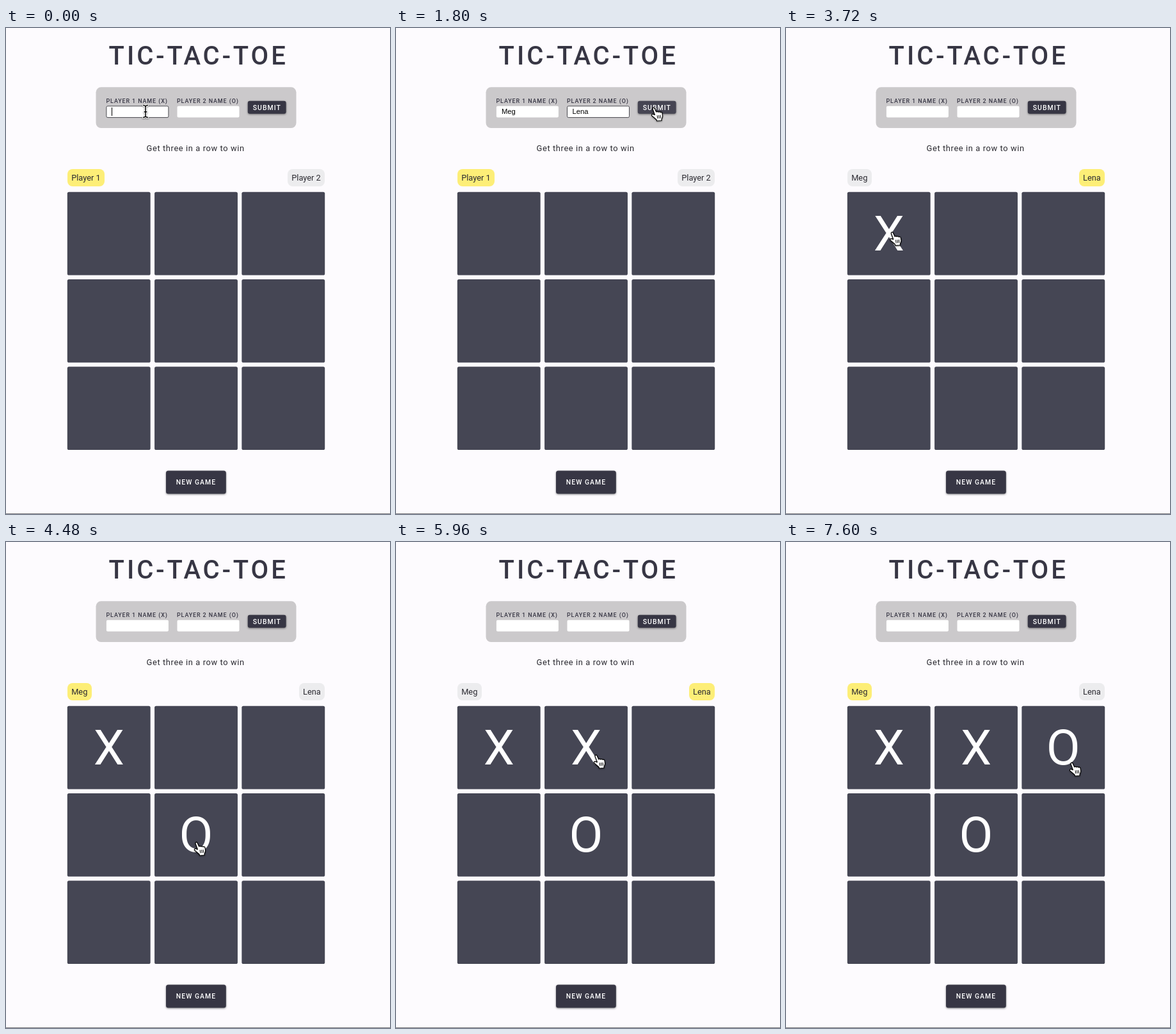
These frames come from a looping animation (600x758 px, 8 s). An HTML page:

```html
<!DOCTYPE html>
<html lang="en">
<head>
<meta charset="utf-8">
<title>Tic-Tac-Toe</title>
<style>
  html, body { margin: 0; width: 100%; height: 100%; overflow: hidden; background: #fdfbfe; }
  body { position: relative; font-family: Roboto, sans-serif; color: #2a2930; }
  svg { position: absolute; left: 0; top: 0; display: block; }
  text { fill: #373644; white-space: pre; }
  .title { font-size: 40px; font-weight: 500; letter-spacing: 4px; }
  .label { font-size: 8.96px; font-weight: 500; letter-spacing: .896px; }
  .hint { font-size: 12.8px; letter-spacing: .64px; fill: #2a2930; }
  .btn text { font-size: 10.4px; font-weight: 500; letter-spacing: 1.04px; fill: #fff; }
  .btn rect { fill: #373644; filter: drop-shadow(0 1.5px 1.5px rgba(0, 0, 0, .45)); }
  .btn.hover rect { fill: #464553; }
  .field rect { fill: #fff; }
  .field.focus rect { stroke: #4a4a50; }
  .field text { font: 11.2px "Liberation Sans", Arial, sans-serif; fill: #000; }
  .field line { stroke: #000; }
  #cells rect { fill: #454654; }
  #cells text { font-size: 76.8px; fill: #fff; text-anchor: middle; }
  .pill {
    position: absolute; top: 219.8px; height: 27.2px; padding: 0 6.4px;
    border-radius: 8px; font-size: 12.8px; line-height: 27.2px;
    background: #ececee; white-space: nowrap;
  }
  .pill.active { background: #fdee77; }
  #p1 { left: 95.8px; }
  #p2 { right: calc(100% - 498.2px); }
  .shadow { filter: drop-shadow(0 1px 1px rgba(0, 0, 0, .4)); }
</style>
</head>
<body>
<svg width="600" height="758" viewBox="0 0 600 758">
  <text class="title" x="160.6" y="57">TIC-TAC-TOE</text>
  <rect x="140.5" y="92.3" width="313" height="63.7" rx="8" fill="#cbc9cb"/>
  <text class="label" x="156.5" y="117">PLAYER 1 NAME (X)</text>
  <text class="label" x="267" y="117">PLAYER 2 NAME (O)</text>
  <g class="field" id="f1">
    <rect x="156.9" y="121.8" width="97" height="17.8" rx="2"/>
    <text x="165" y="134.4"></text>
    <line y1="124" y2="137"/>
  </g>
  <g class="field" id="f2">
    <rect x="267.5" y="121.8" width="97" height="17.8" rx="2"/>
    <text x="275.6" y="134.4"></text>
    <line y1="124" y2="137"/>
  </g>
  <g class="btn" id="submit">
    <rect x="377.8" y="113.8" width="59.8" height="20" rx="3.2"/>
    <text x="385.8" y="127.6">SUBMIT</text>
  </g>
  <text class="hint" x="219.6" y="192.2">Get three in a row to win</text>
  <g id="cells"></g>
  <g class="btn">
    <rect x="250" y="690.6" width="93.8" height="36" rx="3.6"/>
    <text x="265.8" y="712.4">NEW GAME</text>
  </g>
  <rect y="757" width="600" height="1" fill="#7b7a7e"/>
</svg>
<div class="pill" id="p1"></div>
<div class="pill" id="p2"></div>
<svg width="600" height="758" viewBox="0 0 600 758">
  <g id="cursor" class="shadow">
    <g id="beam" fill="none" stroke-linecap="round">
      <path id="beamPath" d="M-3.6 -9.4Q-.6 -9.4 0 -7.4Q.6 -9.4 3.6 -9.4M0 -7.4V7.4M-3.6 9.4Q-.6 9.4 0 7.4Q.6 9.4 3.6 9.4M-1.8 .8H1.8" stroke="#fff" stroke-width="3.2"/>
      <use href="#beamPath" style="stroke:#000"/>
      <path d="M-3.6 -9.4Q-.6 -9.4 0 -7.4Q.6 -9.4 3.6 -9.4M0 -7.4V7.4M-3.6 9.4Q-.6 9.4 0 7.4Q.6 9.4 3.6 9.4M-1.8 .8H1.8" stroke="#000" stroke-width="1.5"/>
    </g>
    <path id="arrow" d="M.4 .2V19.2L4.8 15.2L8.2 23L11.8 21.4L8.5 13.9H14.2Z" fill="#000" stroke="#fff" stroke-width="1.4" stroke-linejoin="round"/>
    <g id="hand" transform="translate(-4 -1)" stroke="#000" stroke-linejoin="round" stroke-linecap="round">
      <path d="M3.1 3.4C2.4 1.4 5 .3 6 2.2L8.7 8C9.5 7 11.3 7.1 11.8 8.2C12.6 7.2 14.4 7.4 14.9 8.6C16 7.8 17.8 8.4 18 10L18.6 14C18.8 16.5 17.5 17.6 17 19.5V21.5L9.5 22L9 20C7 18.6 5 16.5 2.2 14.2C.6 12.8 1.6 11 3.2 11.4L6.4 12.4Z" fill="#fff" stroke-width="1.2"/>
      <path d="M10.2 13.6L10.8 17.8M12.7 13.4L13.2 17.6M15.1 13.2L15.5 17.3" fill="none" stroke-width="1"/>
    </g>
  </g>
</svg>
<script>
  const LOOP = 8000, STEP = 40;
  const SUBMIT = 2040, TAB = 400;
  const names = ["Meg", "Lena"];
  const keys = [[80, 160, 240], [520, 600, 680, 760]];
  // [time, cell, mark]
  const turns = [[3320, 0, "X"], [4480, 4, "O"], [5960, 1, "X"], [7520, 2, "O"]];
  // [start, end, x, y]
  const moves = [
    [920, 1720, 394, 127], [1720, 1800, 402, 124],
    [2720, 3080, 144, 294], [3640, 4040, 297, 468],
    [5000, 5040, 296.5, 467], [5280, 5600, 312, 332],
    [6400, 6880, 389, 528], [6880, 7200, 441, 349], [7240, 7320, 446, 344]
  ];

  const $ = id => document.getElementById(id);
  const show = (el, on) => { el.style.display = on ? "" : "none"; };

  function add(tag, attrs) {
    const el = document.createElementNS("http://www.w3.org/2000/svg", tag);
    for (const k in attrs) el.setAttribute(k, attrs[k]);
    return $("cells").appendChild(el);
  }

  const marks = [];
  for (let i = 0; i < 9; i++) {
    const size = 129.87, pitch = 136.27;
    const x = 95.8 + i % 3 * pitch, y = 255.7 + Math.floor(i / 3) * pitch;
    add("rect", { x, y, width: size, height: size, rx: 2.6 });
    marks.push(add("text", { x: x + size / 2, y: y + 91.2 }));
  }

  function ease(u) {
    const v = Math.pow(Math.min(1, Math.max(0, u)), .9);
    return v * v * (3 - 2 * v);
  }

  function pointer(t) {
    let x = 218, y = 130;
    for (const [a, b, tx, ty] of moves) {
      const k = ease((t - a) / (b - a));
      x += (tx - x) * k;
      y += (ty - y) * k;
    }
    return [x, y];
  }

  const onSubmit = (x, y) => x > 378 && x < 438 && y > 113 && y < 134;

  function shape(x, y) {
    if (y > 257 || onSubmit(x, y)) return "hand";
    const inField = x < 254 || (x > 267 && x < 365);
    return inField && y > 121 && y < 140 ? "beam" : "arrow";
  }

  function drawField(i, t) {
    const field = $("f" + (i + 1));
    const [, text, caret] = field.children;
    const typed = t < SUBMIT ? keys[i].filter(k => k <= t).length : 0;
    const focus = i ? t >= TAB && t < SUBMIT : t < TAB;
    text.textContent = names[i].slice(0, typed);
    field.classList.toggle("focus", focus);
    show(caret, focus && t < 1280);
    const x = +text.getAttribute("x") + .5 + (typed ? text.getComputedTextLength() : 0);
    caret.setAttribute("x1", x);
    caret.setAttribute("x2", x);
  }

  function draw(t) {
    drawField(0, t);
    drawField(1, t);

    const done = turns.filter(turn => turn[0] <= t);
    marks.forEach(m => { m.textContent = ""; });
    done.forEach(([, cell, mark]) => { marks[cell].textContent = mark; });

    names.forEach((name, i) => {
      const pill = $("p" + (i + 1));
      pill.textContent = t < SUBMIT ? "Player " + (i + 1) : name;
      pill.classList.toggle("active", done.length % 2 === i);
    });

    const [x, y] = pointer(t);
    const kind = shape(x, y);
    $("cursor").setAttribute("transform", `translate(${x} ${y})`);
    show($("cursor"), t < 40 || t >= 920);
    for (const id of ["beam", "arrow", "hand"]) show($(id), id === kind);
    $("submit").classList.toggle("hover", onSubmit(x, y));
  }

  const start = performance.now();
  function tick() {
    const t = (performance.now() - start) % LOOP;
    draw(Math.floor(t / STEP) * STEP);
    requestAnimationFrame(tick);
  }
  tick();
</script>
</body>
</html>
```
